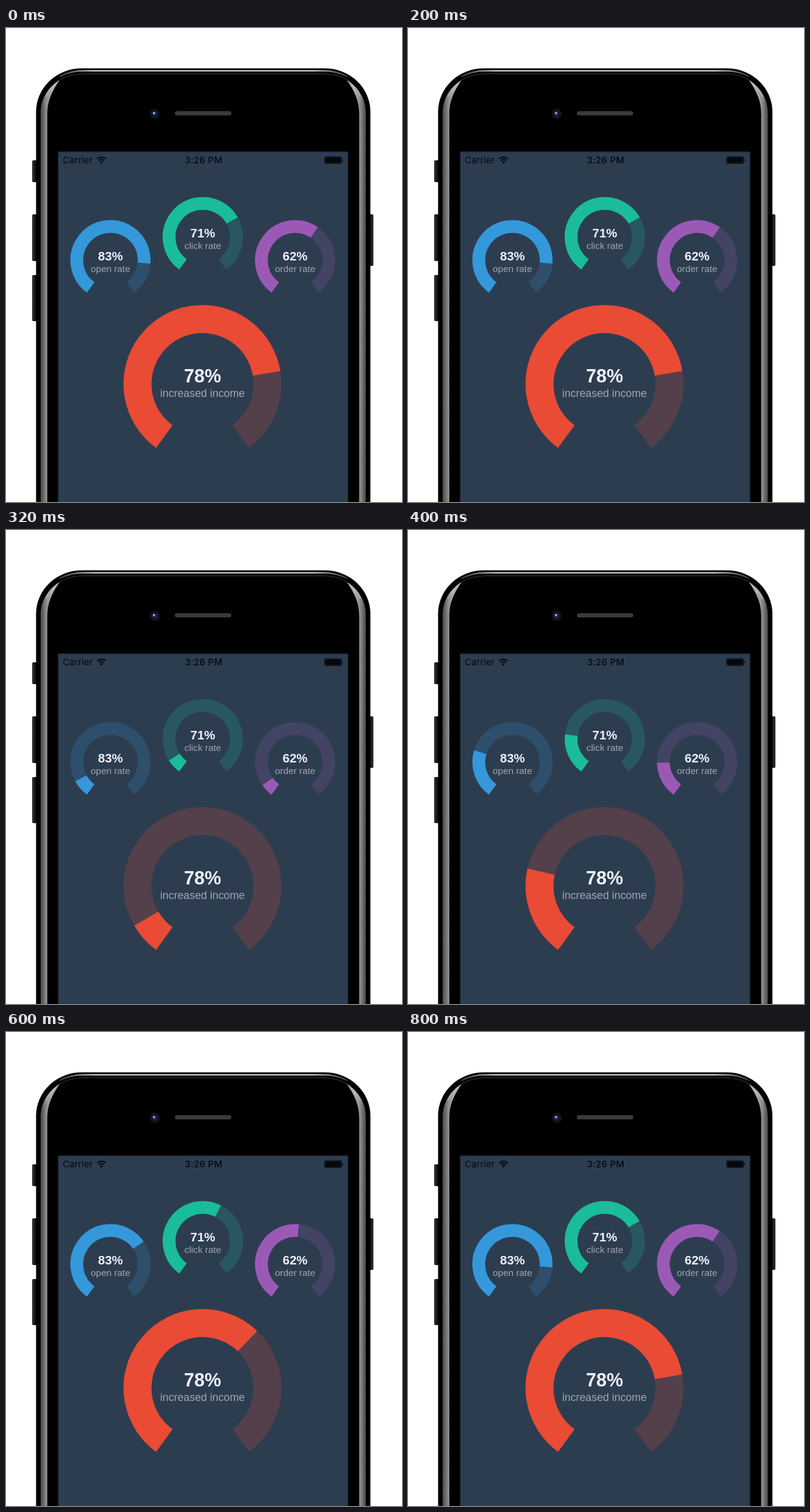
An HTML page for the animation above (840 ms loop, 652 px wide and 781 px high).

```html
<!DOCTYPE html>
<html lang="en">
<head>
<meta charset="utf-8">
<title>Campaign gauges</title>
<style>
  html, body { margin: 0; width: 100%; height: 100%; overflow: hidden; background: #fff; }
  svg { display: block; }
  .status { font: 15px Inter, Roboto, sans-serif; fill: #05080c; }
  .gauge circle { fill: none; }
  .gauge text { font-family: "Liberation Sans", Arial, sans-serif; text-anchor: middle; }
  .value { font-weight: bold; fill: #eef1fb; }
  .label { fill: #a0a6b0; }
</style>
</head>
<body>
<svg width="652" height="781" viewBox="0 0 652 781">
  <defs>
    <linearGradient id="steel">
      <stop offset="0" stop-color="#484848"/>
      <stop offset=".3" stop-color="#8c8c8c"/>
      <stop offset=".6" stop-color="#b2b2b2"/>
      <stop offset=".85" stop-color="#b2b2b2"/>
      <stop offset="1" stop-color="#7a7a7a"/>
    </linearGradient>
    <linearGradient id="rim">
      <stop offset="0" stop-color="#333"/>
      <stop offset=".12" stop-color="#c4c4c4"/>
      <stop offset=".88" stop-color="#c4c4c4"/>
      <stop offset="1" stop-color="#333"/>
    </linearGradient>
    <linearGradient id="key">
      <stop offset="0" stop-color="#383838"/>
      <stop offset=".5" stop-color="#181818"/>
      <stop offset="1" stop-color="#000"/>
    </linearGradient>
    <g id="rail">
      <path fill="url(#steel)" d="M57 781V140C57 116 70 97 88 86C76 104 68 119 68 142V781Z"/>
      <path fill="none" stroke="#bbb" stroke-width="1.2" d="M66 113Q73 97 87 87"/>
    </g>
  </defs>

  <g fill="url(#key)">
    <rect x="43" y="218" width="9" height="36" rx="2"/>
    <rect x="43" y="307" width="9" height="77" rx="2"/>
    <rect x="43" y="407" width="9" height="76" rx="2"/>
    <rect x="43" y="307" width="9" height="85" rx="2" transform="matrix(-1 0 0 1 648 0)"/>
  </g>
  <path d="M49.500 781V138A75 71.500 0 0 1 124.500 66.500H525A75 71.500 0 0 1 600 138V781Z"/>
  <use href="#rail"/>
  <use href="#rail" transform="matrix(-1 0 0 1 649.500 0)"/>
  <path fill="none" stroke="url(#rim)" stroke-width="2.500" d="M88 80Q106 70.500 128 70.500H522Q544 70.500 562 80"/>
  <path fill="none" stroke="#3a3a3a" d="M88 86Q104 75.500 128 75.500H522Q546 75.500 562 86"/>

  <circle cx="245" cy="141.500" r="8" fill="#15161d"/>
  <circle cx="245" cy="141.500" r="5.500" fill="#0c1230"/>
  <circle cx="244.500" cy="141" r="3.300" fill="#26376f"/>
  <circle cx="243.500" cy="140" r="1.600" fill="#c4d0ea"/>
  <rect x="278" y="137" width="93" height="7" rx="3.500" fill="#3a3a3a"/>

  <rect x="85.500" y="203.500" width="478" height="590" fill="#243140"/>
  <rect x="87" y="205" width="475" height="590" fill="#2d3d50"/>

  <g class="status">
    <text x="93.500" y="223">Carrier</text>
    <text x="325.500" y="223" text-anchor="middle" font-weight="500" letter-spacing=".3">3:26 PM</text>
    <path fill="none" stroke="#05080c" stroke-width="2" d="M150 215.800a10.500 10.500 0 0 1 14.500 0M152.700 218.600a6.500 6.500 0 0 1 9 0"/>
    <path d="M157.200 223.500l-2.600-2.800a3.700 3.700 0 0 1 5.200 0Z"/>
    <rect x="524.500" y="212" width="28" height="11.500" rx="2" fill="none" stroke="#05080c"/>
    <rect x="525.500" y="213" width="26" height="9.500" rx="1"/>
    <path d="M553.500 216q3 2 0 4Z"/>
  </g>
  <g id="gauges"></g>
</svg>
<script>
  const START = 126, SWEEP = 288, LOOP = 840, STEP = 40;
  const small = { radius: 55.5, width: 21, valueSize: 20.4, labelSize: 15.35, valueY: 0.5, labelY: 19.5 };
  const large = { radius: 107, width: 46, valueSize: 30.6, labelSize: 17.8, valueY: -2.5, labelY: 21.5 };

  const gauges = [
    { ...small, x: 172, y: 382.5, percent: 83, label: 'open rate', color: '#3498db' },
    { ...small, x: 324, y: 344.5, percent: 71, label: 'click rate', color: '#1abc9c' },
    { ...small, x: 476, y: 382.5, percent: 62, label: 'order rate', color: '#9b59b6' },
    { ...large, x: 323.5, y: 586.5, percent: 78, label: 'increased income', color: '#e94b35' }
  ];

  const ring = (g, extra) => `<circle r="${g.radius}" stroke="${g.color}" stroke-width="${g.width}"
    pathLength="360" transform="rotate(${START})" ${extra}/>`;

  document.getElementById('gauges').innerHTML = gauges.map(g => `
    <g class="gauge" transform="translate(${g.x} ${g.y})">
      ${ring(g, `opacity=".2" stroke-dasharray="${SWEEP} 360"`)}
      ${ring(g, 'class="fill"')}
      <text class="value" y="${g.valueY}" font-size="${g.valueSize}">${g.percent}%</text>
      <text class="label" y="${g.labelY}" font-size="${g.labelSize}">${g.label}</text>
    </g>`).join('');
  const fills = document.querySelectorAll('.fill');

  // [time in ms, phase of the sine ease]; gauges stay full until the first key
  const keys = [[240, .055], [400, .367], [480, .473], [600, .735], [800, .97], [840, 1]];

  function progress(time) {
    if (time < keys[0][0]) return 1;
    const next = keys.findIndex(key => key[0] > time);
    const [t0, p0] = keys[next - 1], [t1, p1] = keys[next];
    const phase = p0 + (p1 - p0) * (time - t0) / (t1 - t0);
    return (1 - Math.cos(Math.PI * phase)) / 2;
  }

  function draw() {
    const time = Math.floor(performance.now() % LOOP / STEP) * STEP;
    const amount = progress(time);
    gauges.forEach((g, i) =>
      fills[i].setAttribute('stroke-dasharray', `${SWEEP * g.percent / 100 * amount} 360`));
    requestAnimationFrame(draw);
  }
  draw();
</script>
</body>
</html>
```
